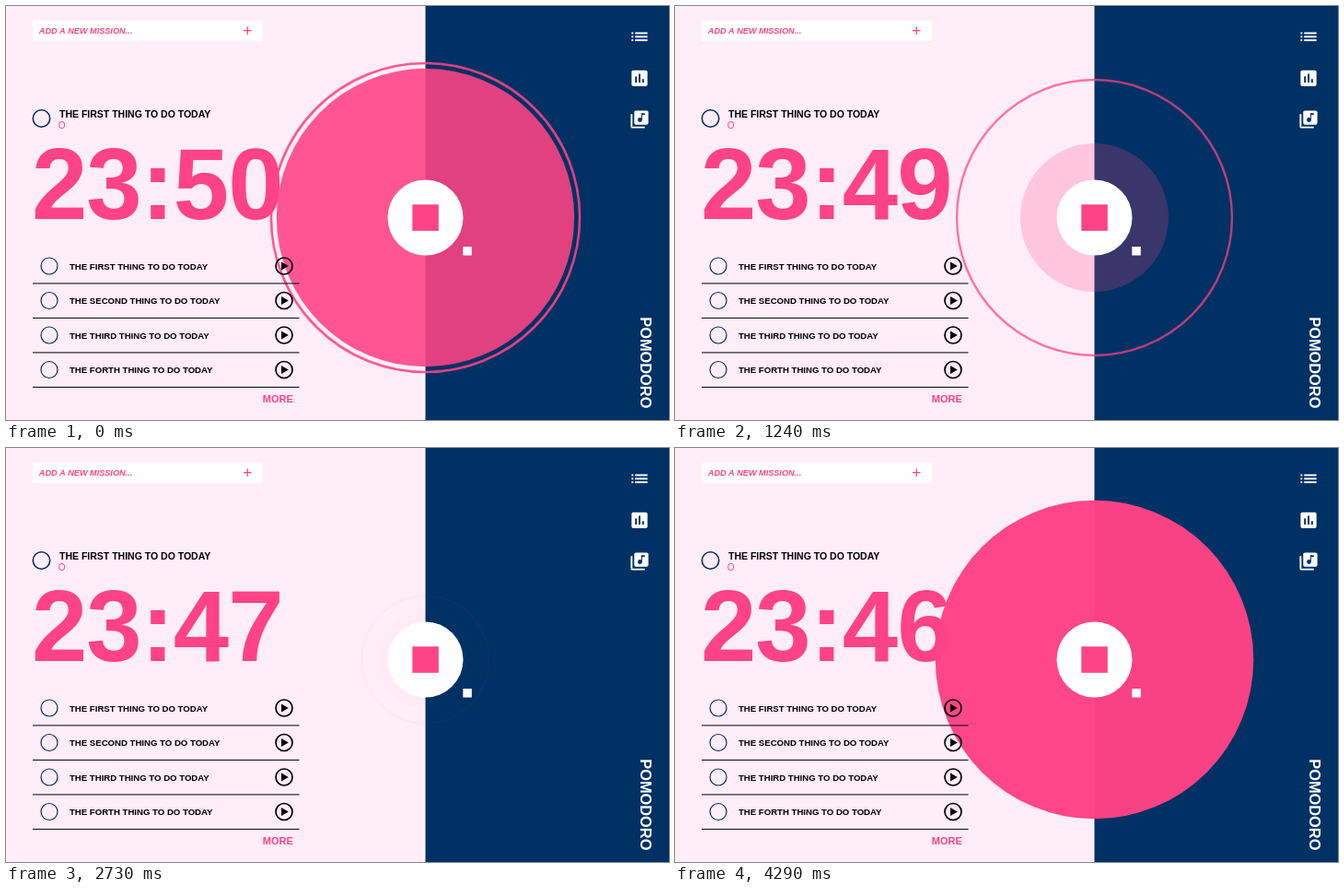
Recreate the animation shown at these times as an HTML page with a canvas. Size 720x449 px, loop 4370 ms.

```html
<!DOCTYPE html>
<html lang="en">
<head>
<meta charset="utf-8">
<title>Pomodoro</title>
<style>
html, body { margin: 0; width: 100%; height: 100%; overflow: hidden; background: #ffedf7; }
canvas { display: block; width: 720px; height: 449px; }
</style>
</head>
<body>
<canvas id="stage" width="720" height="449"></canvas>
<script>
const ctx = document.getElementById('stage').getContext('2d');
const PINK = '#ff4384', NAVY = '#003164', PALE = '#ffedf7', INK = '#000', WHITE = '#fff';
const SANS = '"Liberation Sans", Arial, sans-serif';
const LOOP = 4370, STEP = 78.1, TAU = Math.PI * 2;
const CX = 455.5, CY = 229.5;
const PULSE = { period: 5000, rise: 1500, start: 3105, ringDelay: 1000 };
const TASKS = ['FIRST', 'SECOND', 'THIRD', 'FORTH'];

function bezier(a, b, u) {
  return 3 * a * u * (1 - u) ** 2 + 3 * b * u * u * (1 - u) + u ** 3;
}

// cubic-bezier(.25, .1, .25, 1)
function ease(x) {
  let lo = 0, hi = 1;
  for (let i = 0; i < 24; i++) {
    const mid = (lo + hi) / 2;
    if (bezier(0.25, 0.25, mid) < x) lo = mid; else hi = mid;
  }
  return bezier(0.1, 1, lo);
}

// Quick swell, slow fade
function pulse(t, delay) {
  const { period, rise, start } = PULSE;
  const s = (t - start - delay + 2 * period) % period;
  return s < rise ? ease(s / rise) : 1 - ease((s - rise) / (period - rise));
}

function rect(x, y, w, h, color) {
  ctx.fillStyle = color;
  ctx.fillRect(x, y, w, h);
}

function disc(x, y, r, color) {
  ctx.fillStyle = color;
  ctx.beginPath();
  ctx.arc(x, y, r, 0, TAU);
  ctx.fill();
}

function ring(x, y, r, width, color) {
  ctx.strokeStyle = color;
  ctx.lineWidth = width;
  ctx.beginPath();
  ctx.arc(x, y, r, 0, TAU);
  ctx.stroke();
}

function text(str, x, y, size, color, style = 'bold', spacing = 0) {
  ctx.font = `${style} ${size}px ${SANS}`;
  ctx.letterSpacing = `${spacing}px`;
  ctx.fillStyle = color;
  ctx.fillText(str, x, y);
}

function icon(y, draw) {
  ctx.save();
  ctx.translate(688, y);
  ctx.scale(0.96, 0.96);
  ctx.translate(-12, -12);
  draw();
  ctx.restore();
}

function box(x, y, w, h, r, color) {
  ctx.fillStyle = color;
  ctx.beginPath();
  ctx.roundRect(x, y, w, h, r);
  ctx.fill();
}

function listIcon() {
  for (const y of [7, 11, 15]) {
    rect(3, y, 2, 2, WHITE);
    rect(7, y, 14, 2, WHITE);
  }
}

function chartIcon() {
  box(3, 3, 18, 18, 2, WHITE);
  rect(7, 10, 2, 7, NAVY);
  rect(11, 7, 2, 10, NAVY);
  rect(15, 13, 2, 4, NAVY);
}

function musicIcon() {
  rect(2, 6, 2, 14, WHITE);
  box(2, 20, 16, 2, [0, 0, 0, 2], WHITE);
  box(6, 2, 16, 16, 2, WHITE);
  disc(12.5, 12.5, 2.5, NAVY);
  rect(14, 5, 1, 7.5, NAVY);
  rect(14, 5, 4, 2, NAVY);
}

function drawPulse(t) {
  const d = pulse(t, 0), r = pulse(t, PULSE.ringDelay);
  const radius = 55 + 127.5 * r;
  ctx.globalAlpha = Math.max(0, (r - 0.07) / 0.93);
  ring(CX, CY, radius, 1 + radius * 0.0095, PINK);
  ctx.globalAlpha = d;
  disc(CX, CY, 52 + 124 * d, PINK);
  ctx.globalAlpha = 1;
}

function drawButton() {
  disc(CX, CY, 41, WHITE);
  rect(441.3, 215.3, 28.5, 28.5, PINK);
  rect(496.3, 261, 9.5, 9.5, WHITE);
}

function drawInput() {
  rect(29, 15.5, 250, 22.5, WHITE);
  text('ADD A NEW MISSION...', 35.8, 30, 9.15, PINK, 'italic bold');
  rect(258, 26, 8.5, 1.3, PINK);
  rect(261.6, 22.4, 1.3, 8.5, PINK);
}

function drawTimer(t) {
  ring(38.5, 122, 9.2, 1.6, NAVY);
  text('THE FIRST THING TO DO TODAY', 58, 121, 10.5, INK);
  text('O', 56.7, 133.2, 10, PINK, 'normal');
  const seconds = 50 - Math.floor((t + 360) / 1000);
  text('23:' + seconds, 28, 231.2, 108.5, PINK, 'bold', -1);
}

function drawTask(name, i) {
  const y = 282 + i * 37.5;
  ring(47, y, 9, 1.2, NAVY);
  text(`THE ${name} THING TO DO TODAY`, 69, y + 3.6, 9.6, INK);
  ring(302, y, 9, 1.7, INK);
  ctx.beginPath();
  ctx.moveTo(299, y - 4.6);
  ctx.lineTo(306.8, y);
  ctx.lineTo(299, y + 4.6);
  ctx.fill();
  rect(29, y + 18.4, 289.5, 1, INK);
}

function drawSide() {
  icon(33.3, listIcon);
  icon(78.3, chartIcon);
  icon(123, musicIcon);
  ctx.save();
  ctx.translate(688.8, 337.2);
  ctx.rotate(Math.PI / 2);
  text('POMODORO', 0, 0, 16.4, WHITE);
  ctx.restore();
}

function render(t) {
  rect(0, 0, 720, 449, PALE);
  rect(CX, 0, 720 - CX, 449, NAVY);
  drawPulse(t);
  drawButton();
  drawInput();
  drawTimer(t);
  TASKS.forEach(drawTask);
  text('MORE', 278.8, 430, 11, PINK);
  drawSide();
}

const began = performance.now();
function tick() {
  const t = (performance.now() - began) % LOOP;
  render(Math.floor((t + 10) / STEP) * STEP);
  requestAnimationFrame(tick);
}
tick();
</script>
</body>
</html>
```
